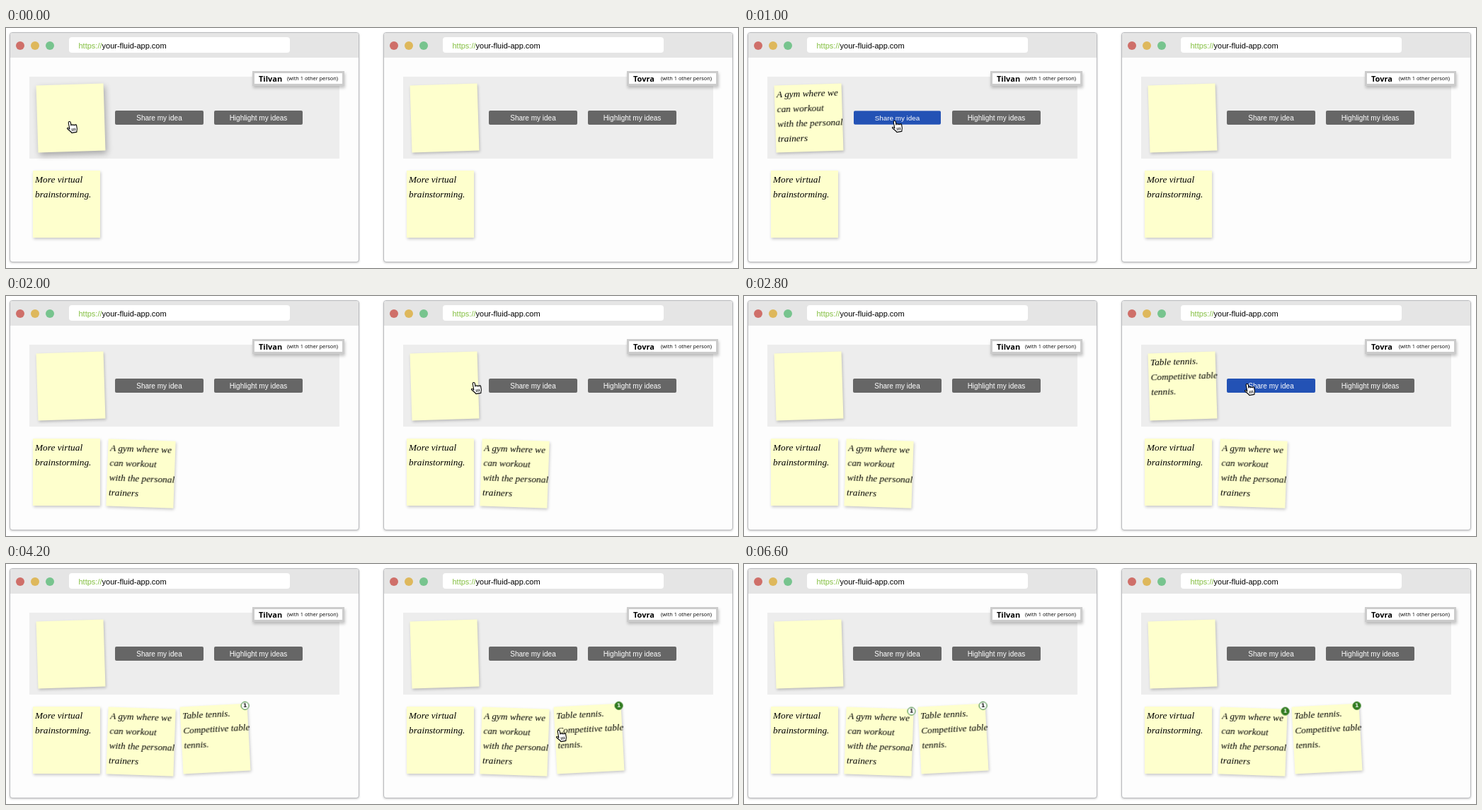
An HTML page for the animation above (6.8 s loop, 1034 by 340 pixels).

```html
<!DOCTYPE html>
<html lang="en">
<head>
<meta charset="utf-8">
<title>Shared brainstorming</title>
<style>
html, body { margin: 0; width: 100%; height: 100%; overflow: hidden; background: #fff; }
#stage { position: relative; width: 1034px; height: 340px; overflow: hidden; font: 11px/1 "Liberation Sans", Arial, sans-serif; }
#stage div, #cursor { position: absolute; box-sizing: border-box; }
.pane { top: 0; width: 506px; height: 340px; }
.right { left: 528px; }
.left { left: 0; }
.window { left: 5px; top: 6px; width: 494px; height: 326px; border: 1px solid #b9babd; border-radius: 4px; background: #fdfdfd; box-shadow: 0 1px 3px rgba(0,0,0,.2); overflow: hidden; }
.bar { left: 0; top: 0; width: 100%; height: 35px; background: #e5e5e5; }
.dot { top: 19px; width: 12px; height: 12px; border-radius: 50%; }
.url { left: 89px; top: 13px; width: 312px; height: 22px; padding-left: 13.5px; border-radius: 4px; background: #fff; line-height: 25px; white-space: nowrap; color: #000; }
.url span { color: #84bf41; }
.panel { left: 33px; top: 69px; width: 438px; height: 116px; background: #ededed; }
.tag { right: 28px; top: 61px; width: 130px; height: 21px; padding: 0 6px; border: 3px solid #ccc; background: #fff; box-shadow: 1px 3px 4px rgba(0,0,0,.22); display: flex; justify-content: space-between; align-items: center; white-space: nowrap; font: 7.4px/15px "Open Sans", "Noto Sans", sans-serif; color: #000; }
.tag b { font-size: 11px; }
.right .tag { width: 129px; }
.button { top: 117px; width: 125px; height: 20px; border-radius: 2px; background: #666; color: #fff; font-size: 10px; line-height: 21px; text-align: center; }

.note { width: 95px; height: 95px; padding: 1.5px 0 0 3px; background: #feffcd; box-shadow: 1px 2px 4px rgba(0,0,0,.22); white-space: pre; color: #000; font: italic 13.3px/21px "Apple Chancery", "Liberation Serif", serif; }
.input { left: 43.5px; top: 79.5px; transform: rotate(-1.8deg); }
.more { left: 38px; top: 202px; }
.gym { left: 143px; top: 203.5px; transform: rotate(2deg); }
.tennis { left: 248px; top: 199.5px; transform: rotate(-3deg); }
.badge { right: -3px; top: -3px; width: 12px; height: 12px; border: 1.5px solid #2f7d2a; border-radius: 50%; background: #fff; color: #000; font: bold 7.5px/9px "DejaVu Sans", sans-serif; text-align: center; }
.right .badge { background: #317b20; border-color: #317b20; color: #fff; }
#cursor { left: 0; top: 0; width: 18px; height: 19px; overflow: visible; }

/* all motion shares one 6.8 s clock that ticks every 200 ms */
.typed, .typed span, .gym, .tennis, .badge, .share, .input, .shade, #cursor { animation: 6800ms step-end infinite; }
.typed span { animation-name: typed; animation-delay: calc(var(--at) * 1ms - 6801ms); }
.left .typed { animation-name: clear-left; }
.right .typed { animation-name: clear-right; }
.left .share { animation-name: share-left; }
.right .share { animation-name: share-right; }
.left .input { animation-name: lift-left; }
.right .input { animation-name: lift-right; }
.gym { animation-name: add-gym; }
.tennis { animation-name: add-tennis; }
.right .gym { animation-name: add-gym, lift-gym; }
.right .tennis { animation-name: add-tennis, lift-tennis; }
.gym .badge { animation-name: vote-gym; }
.tennis .badge { animation-name: vote-tennis; }
#cursor { animation-name: point; }

@keyframes typed { 0% { opacity: 1 } 50%, 100% { opacity: 0 } }
@keyframes clear-left { 0% { opacity: 1 } 17.64%, 100% { opacity: 0 } }
@keyframes clear-right { 0% { opacity: 1 } 47.05%, 100% { opacity: 0 } }
@keyframes add-gym { 0% { opacity: 0 } 17.64%, 100% { opacity: 1 } }
@keyframes add-tennis { 0% { opacity: 0 } 47.05%, 100% { opacity: 1 } }
@keyframes vote-tennis { 0% { opacity: 0 } 55.88%, 100% { opacity: 1 } }
@keyframes vote-gym { 0% { opacity: 0 } 70.58%, 100% { opacity: 1 } }
@keyframes share-left {
  0%, 23.52%, 100% { background: #666 }
  11.76%, 17.64% { background: #2352b5; transform: none }
  14.7% { background: #2352b5; transform: scale(.984) }
  20.58% { background: #4e5f7d }
}
@keyframes share-right {
  0%, 52.94%, 100% { background: #666 }
  41.17%, 47.05% { background: #2352b5; transform: none }
  44.11% { background: #2352b5; transform: scale(.984) }
  49.99% { background: #4e5f7d }
}
@keyframes lift-left {
  0% { box-shadow: 2px 4px 8px rgba(0,0,0,.3) }
  11.76%, 100% { box-shadow: 1px 2px 4px rgba(0,0,0,.22) }
}
@keyframes lift-right {
  0%, 38.23%, 100% { box-shadow: 1px 2px 4px rgba(0,0,0,.22) }
  32.35% { box-shadow: 2px 4px 8px rgba(0,0,0,.3) }
}
@keyframes lift-tennis {
  0%, 61.76%, 100% { box-shadow: 1px 2px 4px rgba(0,0,0,.22) }
  49.99% { box-shadow: 2px 4px 8px rgba(0,0,0,.3) }
}
@keyframes lift-gym {
  0%, 85.29%, 100% { box-shadow: 1px 2px 4px rgba(0,0,0,.22) }
  64.7% { box-shadow: 2px 4px 8px rgba(0,0,0,.3) }
}
@keyframes point {
  0% { transform: translate(84px, 131px); opacity: 1 }
  8.82% { transform: translate(100px, 131px) }
  11.76% { transform: translate(180px, 130px) }
  14.7% { transform: translate(207px, 130px) }
  17.64% { transform: translate(208px, 130px) }
  20.58% { transform: translate(300px, 142px) }
  23.52% { transform: translate(430px, 136px) }
  26.47% { transform: translate(570px, 126px) }
  29.41% { transform: translate(655px, 121px) }
  32.35% { transform: translate(640px, 122px) }
  38.23% { transform: translate(668px, 123px) }
  41.17% { transform: translate(705px, 123px) }
  44.11% { transform: translate(722px, 125px) }
  47.05% { transform: translate(726px, 127px) }
  49.99% { transform: translate(794px, 223px) }
  52.94% { transform: translate(802px, 230px) }
  61.76% { transform: translate(775px, 234px) }
  64.7% { transform: translate(742px, 238px) }
  67.64% { transform: translate(727px, 238px); opacity: 1 }
  85.29% { transform: translate(760px, 275px); opacity: 1 }
  88.23%, 100% { transform: translate(760px, 275px); opacity: 0 }
}
</style>
</head>
<body>
<div id="stage">
  <svg id="cursor" viewBox="0 0 18 19">
    <g transform="rotate(-10 9 10)" stroke="#000" stroke-width="1.1" stroke-linejoin="round" stroke-linecap="round">
      <path fill="#fff" d="M5.5 11.5V2.5a1.5 1.5 0 0 1 3 0V7a1.3 1.3 0 0 1 2.6.3a1.3 1.3 0 0 1 2.5.5a1.2 1.2 0 0 1 2.4.6V12c0 2-1 3-1.3 5.5H7.5C7 15 4 13 2.6 10.8C1.8 9.4 3.6 8.6 5.5 11.5Z"/>
      <path fill="none" stroke-width=".8" d="M8.8 11.8v3M10.9 11.8v3M13 11.8v3"/>
    </g>
  </svg>
</div>
<script>
const gym = "A gym where we\ncan workout\nwith the personal\ntrainers";
const tennis = "Table tennis.\nCompetitive table\ntennis.";

// splits the text at the given lengths; each piece shows 200 ms after the last
const typed = (text, start, cuts) => cuts.map((from, i) =>
  `<span style="--at:${start + i * 200}">${text.slice(from, cuts[i + 1])}</span>`).join("");

const dots = [["#cf6f69", 14], ["#deb85c", 35], ["#77c48e", 56]]
  .map(([color, x]) => `<div class="dot" style="left:${x}px;background:${color}"></div>`).join("");

const pane = (side, name, draft) => `
  <div class="pane ${side}">
    <div class="window"><div class="bar"></div></div>
    ${dots}
    <div class="url"><span>https://</span>your-fluid-app.com</div>
    <div class="panel"></div>
    <div class="tag"><b>${name}</b><span>(with 1 other person)</span></div>
    <div class="note input"><span class="typed">${draft}</span></div>
    <div class="button share" style="left:154px">Share my idea</div>
    <div class="button" style="left:294px">Highlight my ideas</div>
    <div class="note more">More virtual\nbrainstorming.</div>
    <div class="note gym">${gym}<div class="badge">1</div></div>
    <div class="note tennis">${tennis}<div class="badge">1</div></div>
  </div>`;

document.getElementById("stage").insertAdjacentHTML("afterbegin",
  pane("left", "Tilvan", typed(gym, 200, [0, 11, 26, 40])) +
  pane("right", "Tovra", typed(tennis, 2200, [0, 13, 25])));

for (const dot of document.querySelectorAll(".dot"))
  dot.style.translate = "0 0";
</script>
</body>
</html>
```
